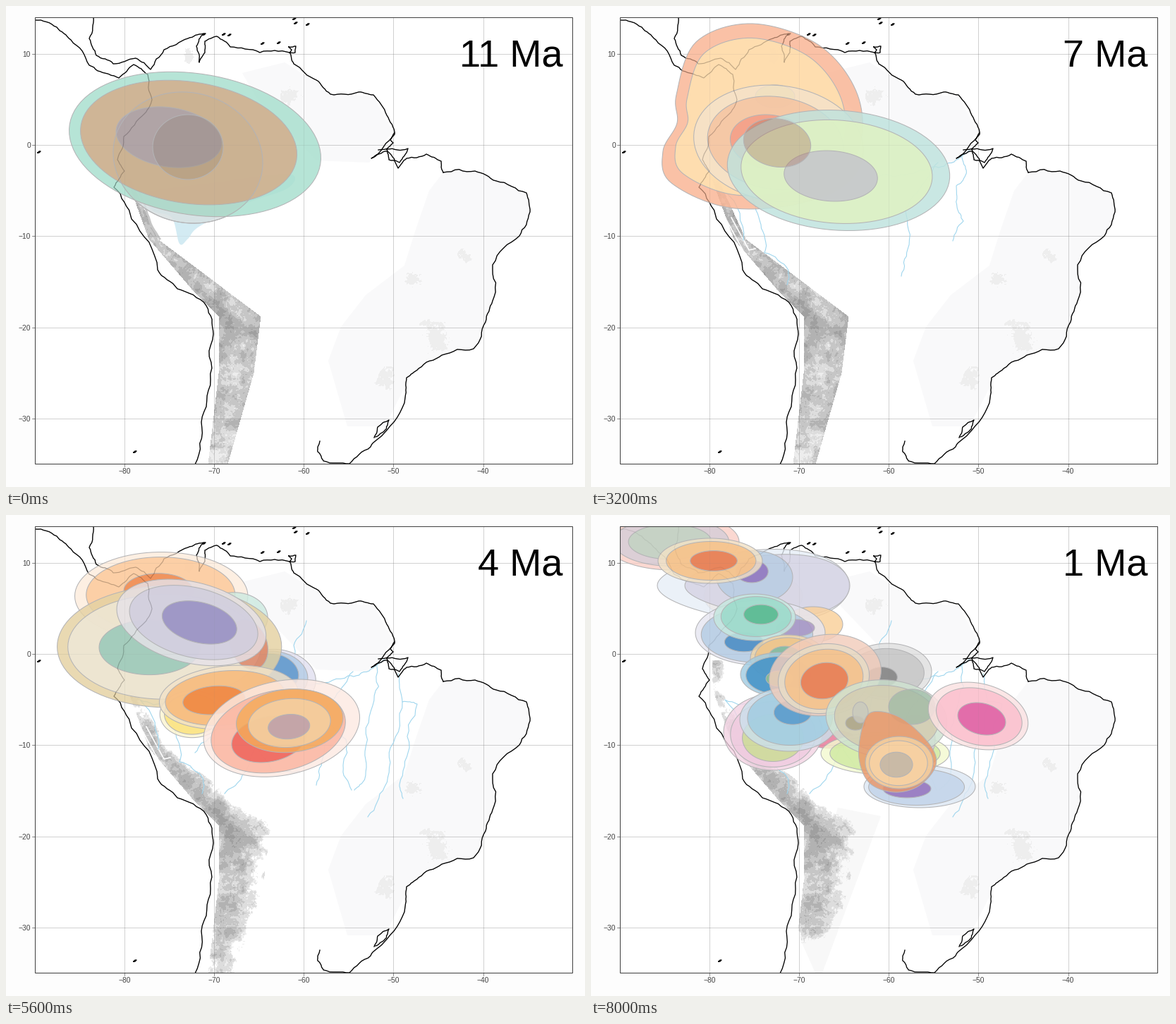
Animation, 821 px wide and 682 px high, one loop 8.8 s. Source, as a matplotlib script:

```python
import numpy as np
import matplotlib.pyplot as plt
from matplotlib.animation import FuncAnimation
from matplotlib.colors import to_rgb
from matplotlib.patches import Polygon, Rectangle

W, H = 821, 682
PX = 0.72
GRAY = "#b4b4b6"
rng = np.random.default_rng(4)

fig = plt.figure(figsize=(W / 100, H / 100), dpi=100, facecolor="#fdfdfd")
ax = fig.add_axes([0, 0, 1, 1])
ax.axis("off")
frame = Rectangle((41, 16), 762, 633, fc="white", ec="none", zorder=0)
ax.add_patch(frame)


def pairs(*v):
    return np.reshape(np.array(v, float), (-1, 2))


def clip(artist, z):
    artist.set_zorder(z)
    artist.set_clip_path(frame)
    return artist


def line(p, color, width, z, alpha=1):
    return clip(ax.plot(*p.T, color=color, lw=width * PX, alpha=alpha)[0], z)


def area(p, color, z, edge="none"):
    return clip(ax.add_patch(Polygon(p, fc=color, ec=edge, lw=0.75)), z)


def rough(p, amp=0.09, depth=3):
    """Ragged line by midpoint displacement."""
    for _ in range(depth):
        d = np.diff(p, axis=0)
        k = rng.uniform(-amp, amp, (len(d), 1))
        out = np.empty((2 * len(p) - 1, 2))
        out[::2] = p
        out[1::2] = (p[1:] + p[:-1]) / 2 + k * d[:, ::-1] * (1, -1)
        p = out
    return p


def smooth(p, n=12):
    """Closed Catmull-Rom curve through key points."""
    t = np.linspace(0, 1, n, endpoint=False)[:, None]
    a, b, c, d = (np.roll(p, s, 0)[:, None] for s in (1, 0, -1, -2))
    q = b + t * ((c - a) + t * ((2 * a - 5 * b + 4 * c - d) + t * (3 * (b - c) + d - a))) / 2
    return q.reshape(-1, 2)


# ---------------------------------------------------------------- coasts
west = rough(pairs(
    41, 20, 72, 30, 92, 48, 118, 84, 144, 96, 160, 102, 181, 83, 201, 97, 207, 133,
    197, 152, 167, 185, 158, 218, 168, 234, 153, 257, 178, 302, 215, 374, 243, 401,
    284, 425, 294, 465, 290, 530, 277, 590, 268, 650))
north = rough(pairs(
    124, 16, 118, 46, 128, 70, 152, 82, 184, 74, 205, 90, 224, 62, 258, 46, 280, 39,
    270, 57, 274, 80, 282, 66, 282, 50, 299, 43, 318, 58, 360, 66, 402, 66, 408, 82,
    440, 105, 460, 125, 500, 122, 521, 126, 540, 155, 551, 182, 518, 216, 541, 206,
    556, 230, 568, 216, 596, 210, 617, 220, 620, 236))
east = rough(pairs(
    620, 236, 665, 234, 695, 248, 738, 265, 743, 292, 728, 326, 690, 367, 690, 418,
    680, 448, 663, 486, 618, 495, 585, 514, 568, 527, 566, 555, 535, 607, 517, 625,
    487, 649, 450, 645, 442, 632, 445, 617))
marajo = rough(pairs(540, 203, 570, 202, 558, 222, 543, 218, 540, 203))
mouth = rough(pairs(551, 180, 545, 190, 549, 194, 538, 203, 528, 204))
lagoon = rough(pairs(522, 612, 527, 597, 543, 587, 539, 600, 524, 611))
trinidad = rough(pairs(401, 58, 411, 57, 410, 66, 402, 66, 405, 62, 401, 58))
coasts = [west, north, east, marajo, mouth, lagoon, trinidad]
for x, y in pairs(281, 40, 309, 40, 317, 41, 364, 53, 387, 52, 409, 18, 411, 24,
                  428, 26, 47, 207, 183, 632):
    coasts.append(pairs(x - 2, y + 1, x, y - 1, x + 2, y - 1, x, y + 1, x - 2, y + 1))

for c in coasts:
    line(c, "black", 1.3, 4)
ghosts = [line(c, "black", 1.1, 8) for c in coasts]

# ---------------------------------------------------------------- grid and labels
small = dict(family="Liberation Sans", fontsize=7.4, color="#444444")


def rule(*p):
    line(pairs(*p), "#808080", 1, 3, 0.3)
    line(pairs(*p), "#808080", 1, 8, 0.08)


for i in range(5):
    x, y = 168 + 127.15 * i, 67.5 + 129.4 * i
    rule(x, 16, x, 649)
    ax.plot([x, x], [649, 653], color="#555555", lw=0.5)
    ax.text(x, 660, f"−{80 - 10 * i}", ha="center", va="center", **small)
    rule(41, y, 803, y)
    if y < 649:
        ax.plot([37, 41], [y, y], color="#555555", lw=0.5)
        ax.text(35, y, f"{10 - 10 * i}".replace("-", "−"), ha="right",
                va="center_baseline", **small)
ax.add_patch(Rectangle((41, 16), 762, 633, fc="none", ec="#444444", lw=0.75, zorder=10))
title = ax.text(789.5, 86, "", ha="right", va="baseline", family="Liberation Sans",
                fontsize=39, zorder=9)

# ---------------------------------------------------------------- relief
shore = east[east[:, 1] < 580][:100]
area(np.vstack([shore, pairs(537, 596, 484, 596, 457, 503, 475, 455, 510, 410, 565, 368,
                             580, 320, 600, 262)]), "#f9f9fa", 1)
area(pairs(335, 95, 395, 80, 440, 108, 460, 125, 521, 128, 548, 178, 515, 222,
           440, 219, 355, 130), "#f9f9fa", 1)


def noise(cell):
    """Smooth value noise over the stage."""
    g = rng.random((H // cell + 2, W // cell + 2))
    y, x = np.mgrid[:H, :W] / cell
    j, i = y.astype(int), x.astype(int)
    v, u = y - j, x - i
    top = g[j, i] * (1 - u) + g[j, i + 1] * u
    low = g[j + 1, i] * (1 - u) + g[j + 1, i + 1] * u
    return top * (1 - v) + low * v


grain = 0.5 * noise(16) + 0.3 * noise(6) + 0.2 * noise(2)
Y, X = np.mgrid[:H, :W]


def picture(shade, mask, z):
    rgba = np.ones((H, W, 4)) * np.reshape(shade, np.shape(shade) + (1,))
    rgba[..., 3] = mask
    return clip(ax.imshow(rgba, extent=(0, W, H, 0), aspect="auto",
                          interpolation="nearest"), z)


hills = np.zeros((H, W))
for x, y, r in ((575, 385, 16), (605, 470, 28), (540, 530, 20), (653, 355, 14),
                (405, 126, 17), (258, 75, 16)):
    hills = np.maximum(hills, 1 - np.hypot(X - x, Y - y) / r)
picture(0.935, (hills > 0) & (hills * 0.4 + grain > 0.72), 1.5)

KNOTS = [245, 330, 400, 440, 520, 649]
edge = np.interp(Y, KNOTS, [171, 202, 262, 301, 301, 286])
width = np.interp(Y, KNOTS, [5, 13, 46, 60, 50, 28])
SHADES = np.array([0.93, 0.87, 0.78, 0.7, 0.63])


def andes(top, spread=0, fade=0, end=660):
    u = (X - edge) / (width + spread)
    v = 0.62 + 1.3 * (grain - 0.5) - 0.2 * np.clip((Y - 470) / 130, 0, 1)
    v -= 0.14 * np.exp(-((u - 0.5) / 0.25) ** 2) * (fade == 0)
    v -= fade * np.clip(u - 0.45, 0, 1) ** 1.4 + fade * np.clip(0.12 - u, 0, 1)
    v -= 0.45 * (fade > 0) * np.clip((330 - Y) / 50, 0, 1)
    v -= 0.8 * np.clip((Y - end + 45) / 45, 0, 2) * (end < 649)
    shade = SHADES[np.digitize(v, [0.14, 0.34, 0.57, 0.82])]
    return picture(shade, (u > 0) & (u < 1) & (Y > top) & ((v > 0.05) | (fade == 0)), 2)


ranges = [andes(245), andes(245, 4), andes(245, 14, 1.7), andes(205, 16, 1.7, 625)]
apron = area(pairs(350, 415, 411, 427, 328, 649, 318, 649, 296, 600), "#f8f8f8", 1)
strips = [line(rough(pairs(*p), 0.04), "#c6c6c6", 3, 2)
          for p in ((188, 262, 204, 305, 218, 330), (198, 308, 222, 350))]
gaps = [line(pairs(*p), "white", 1.6, 2.5)
        for p in ((188, 296, 217, 349), (199, 300, 224, 346, 233, 344))]

# ---------------------------------------------------------------- water
lake = area(smooth(pairs(200, 265, 208, 290, 235, 300, 246, 337, 258, 330, 275, 312,
                         340, 280, 400, 258, 400, 238, 300, 250)), "#d3ebf3", 3.5)


def river(*v, color="#9fd6ee"):
    return line(rough(pairs(*v), 0.12), color, 1.1, 3.5)


outlet = river(400, 250, 440, 237, 490, 224, 520, 220, color="#d3ebf3")
early = [
    river(536, 205, 515, 221, 485, 228, 440, 239, 405, 243, 300, 258, 230, 268, 190, 262,
          216, 332),
    river(492, 222, 467, 258, 446, 290, 449, 345, 440, 383),
    river(230, 268, 241, 310, 246, 350, 280, 375, 278, 395)]
xingu = river(526, 215, 531, 240, 518, 255, 519, 285, 528, 305, 513, 333)
late = [
    river(426, 150, 408, 185, 395, 245),
    river(400, 243, 358, 325, 333, 375, 310, 395),
    river(357, 330, 378, 363, 416, 363),
    river(290, 315, 268, 337),
    river(448, 284, 482, 318, 478, 355, 490, 390),
    river(526, 215, 520, 270, 509, 335, 505, 380, 494, 390),
    river(556, 225, 562, 265, 583, 268, 572, 330, 558, 382, 563, 402),
    river(562, 265, 545, 330, 537, 385, 513, 428)]

# ---------------------------------------------------------------- habitat shapes
live = []
drift = dict(move=(0, 0), k=1)
T = np.linspace(0, 2 * np.pi, 90, endpoint=False)


def put(color, p, a=0.83):
    p = (p - (270, 190)) * drift["k"] + (270, 190) + drift["move"]
    live.append(area(p, (*to_rgb(color), a), 6, GRAY))


def egg(color, cx, cy, rx, ry, tilt=0, a=0.83, taper=0, droop=0):
    """Ellipse; taper narrows its right end, droop its lower end."""
    c, s = np.cos(T), np.sin(T)
    x, y = rx * c * (1 - droop * s), ry * s * (1 - taper * c)
    r = np.radians(tilt)
    put(color, np.c_[cx + x * np.cos(r) - y * np.sin(r),
                     cy + x * np.sin(r) + y * np.cos(r)], a)


def nest(colors, cx, cy, rx, ry, tilt=0, dx=0, dy=0, core=0.42, mid=0.86, **bend):
    """Rings whose centres slide by (dx, dy) towards the innermost one."""
    colors = colors.split()
    scales = (1, mid, core)[:len(colors)]
    for color, s in zip(colors, scales):
        f = (1 - s) / (1 - scales[-1])
        egg("#" + color, cx + f * dx, cy + f * dy, rx * s, ry * s, tilt, **bend)


def blob(colors, *v, inner=0.85):
    p = smooth(pairs(*v))
    for i, color in enumerate(colors.split()):
        put("#" + color, p.mean(0) + (p - p.mean(0)) * inner ** i)


def ma11():
    egg("#dce9ee", 258, 215, 107, 92, 15)
    nest("a8dfce d5ac89 aca3b0", 268, 196, 180, 100, 9, -37, -10)
    egg("#b09070", 258, 215, 107, 92, 15, a=0.08)
    egg("#80705f", 258, 200, 50, 46, a=0.22)


def ma10():
    nest("f0eaf1 cad2e7 5fb8b3", 295, 219, 158, 95, 0, -20, -9, 0.39, droop=0.2)
    nest("a6ddcc d6ae89 aaa3b0", 299, 173, 138, 66, 8, 27, -5)
    egg("#1f908a", 275, 210, 62, 38, 8, a=0.35)


def ma8():
    nest("eee9f2 c8d6e7", 283, 165, 149, 67)
    nest("eee9f2 c9d7e8", 285, 248, 133, 44, 3)
    egg("#eb9879", 290, 199, 128, 69, 14)
    nest("f4e6b8 f6c674 ed7847", 291, 188, 112, 71, 14, 3, 3, 0.46)


def ma6():
    blob("f9b594 ffe3b2", 117, 130, 145, 55, 225, 29, 320, 60, 374, 130, 375, 210,
         320, 275, 200, 291, 110, 255, 98, 210, 118, 170)
    egg("#d9da8c", 257, 132, 28, 16)
    nest("f5e2ca f5c3a0 f49c86", 262, 199, 121, 82, 8, -12, -2, 0.47, 0.8)
    nest("bfe3de e1f3c2 c5c4cc", 347, 237, 158, 85, 4, -11, 8)
    egg("#a86c58", 260, 198, 48, 34, 10, a=0.35)


def ma5():
    blob("fdecdd fcc79a", 41, 172, 75, 125, 160, 90, 240, 45, 300, 34, 365, 65,
         368, 110, 300, 190, 130, 217, 60, 205)
    egg("#f08e52", 185, 150, 80, 30, -14)
    nest("f8e3a8 fad078", 242, 208, 119, 84, 10)
    nest("dfe3ee c5d4e4 8f9a90", 320, 270, 78, 55, 0, 5, 10, 0.38)
    egg("#d3e2a4", 265, 245, 95, 43)
    nest("e9e5f2 dabcdf", 289, 196, 131, 72, -10)
    egg("#cb9fb8", 240, 195, 64, 26, a=0.75)
    egg("#d9578f", 264, 210, 54, 33)
    nest("faf2c4 f4bd78 f27646", 342, 242, 131, 60, 10, -13, 0)
    egg("#ee8a80", 268, 209, 52, 32, a=0.5)


def ma3():
    nest("fdecdd fcc99a ee8850", 226, 114, 118, 60, 0, -4, -7, 0.4)
    egg("#cdeae0", 325, 143, 46, 34)
    nest("e2e0f0 b5cde7 5d96cc", 385, 225, 52, 38, 10, -8, -6, 0.7)
    nest("e5d2a3 efe8d8 96c8b8", 237, 183, 153, 83, 0, -27, 1, 0.45)
    egg("#dc8468", 345, 180, 25, 35, -20)
    nest("e6e2e8 d0cdde 958dc2", 267, 150, 104, 55, 14, 11, 0, 0.5)
    nest("fcf5d0 fbe27c", 268, 275, 44, 32)
    nest("f2e2c8 f8b878 ef843e", 318, 252, 95, 43, -5, -20, 4, 0.45)
    nest("fdeae3 fbb5a0 ee6058", 390, 294, 108, 64, -12, -17, 15, 0.48)
    nest("f4aa5a f4d2a6 bb9eac", 401, 284, 73, 43, -5, -1, 8, 0.39, 0.77)


def ma1():
    nest("fbd0c8 d6ced8 c2d3c2", 115, 38, 95, 40, 0, -3, 0, 0.62)
    egg("#fbc49c", 230, 115, 70, 35)
    nest("e8eff7 d6d4e4", 230, 100, 136, 50, 0, 20, 0, taper=-0.25)
    nest("b8cde3 8e70bd", 232, 88, 54, 37, 0, -4, -8, mid=0.43)
    egg("#fad09a", 315, 155, 42, 25)
    nest("e6e6f1 b4cce4 4589c2", 240, 167, 92, 46, 0, -23, 13, 0.3)
    egg("#a894c4", 290, 160, 27, 12)
    nest("f2e2c6 f7c086 e67852", 169, 65, 74, 32, 0, 5, 0, 0.45)
    nest("c6e8df 9adaca 54b88c", 232, 145, 58, 33, 0, 9, -4)
    nest("f2d6a8 efc488 76bba8", 280, 203, 54, 33, 0, -5, -3)
    nest("e0e0e0 c6c6c6 828282", 421, 222, 62, 40, 0, -9, 8, 0.36)
    nest("a3cde3 3f90c6 96c48a", 266, 226, 54, 31, 0, 1, 6, 0.35)
    egg("#e87898", 340, 318, 36, 13)
    nest("f3d4e4 f0cce0 cbdd94", 258, 308, 70, 54, 0, 0, 8, 0.62)
    nest("cbe0eb a0cce1 5598cb", 281, 290, 70, 45, 0, 5, -10, 0.38)
    nest("f4fad0 d0eaa2", 417, 338, 91, 30)
    egg("#f2cdbc", 332, 227, 80, 57, -10)
    nest("e7dcc6 f6c088 e67852", 330, 232, 65, 49, -10, 1, 3, 0.52)
    nest("dde7f3 c2d4e9 9470bd", 466, 385, 79, 30, 0, -18, 3, 0.43)
    egg("#dccbe4", 460, 318, 28, 34)
    nest("cfe3d1 d4ccb0", 419, 289, 86, 55, 5)
    egg("#9cb8a4", 455, 272, 33, 25, a=0.7)
    egg("#aca488", 375, 295, 14, 10)
    egg("#c9c9be", 382, 280, 11, 15)
    blob("ea986a", 380, 345, 385, 300, 400, 279, 440, 288, 480, 325, 489, 355,
         465, 384, 430, 393, 395, 380)
    nest("f4d2a2 f8d2a4 c0b6a8", 437, 351, 48, 37, 0, -4, 3, 0.48)
    nest("fbe2e2 fbbfcd dd5ca3", 549, 285, 72, 46, 14, 5, 4, 0.48)


# age: scene, drift, scale
SCENES = {11: (ma11, (0, 0), 1), 10: (ma10, (0, 0), 1), 9: (ma8, (-3, 4), 0.97),
          8: (ma8, (0, 0), 1), 7: (ma6, (4, -4), 1), 6: (ma6, (0, 0), 1),
          5: (ma5, (0, 0), 1), 4: (ma3, (-4, 4), 1.04), 3: (ma3, (0, 0), 1),
          2: (ma1, (-4, 2), 1.02), 1: (ma1, (0, 0), 1)}


def show(artists, on):
    for a in artists:
        a.set_visible(on)


def draw(i):
    age = 11 - i
    while live:
        live.pop().remove()
    scene, drift["move"], drift["k"] = SCENES[age]
    scene()
    title.set_text(f"{age} Ma")
    stage = (age < 9) + (age < 7) + (age < 2)
    for k, r in enumerate(ranges):
        r.set_visible(k == stage)
    show([apron], age == 1)
    show(strips, age > 8)
    show(gaps, 1 < age < 9)
    show([lake], age > 9)
    show([outlet], age == 10)
    show(early, age < 10)
    show([xingu], 5 < age < 10)
    show(late, age < 6)
    for g in ghosts:
        g.set_alpha(0.22 if age > 2 else 0.06)
    return live


ax.set(xlim=(0, W), ylim=(H, 0))
anim = FuncAnimation(fig, draw, frames=11, interval=800, repeat=True, repeat_delay=0)
plt.show()
```
